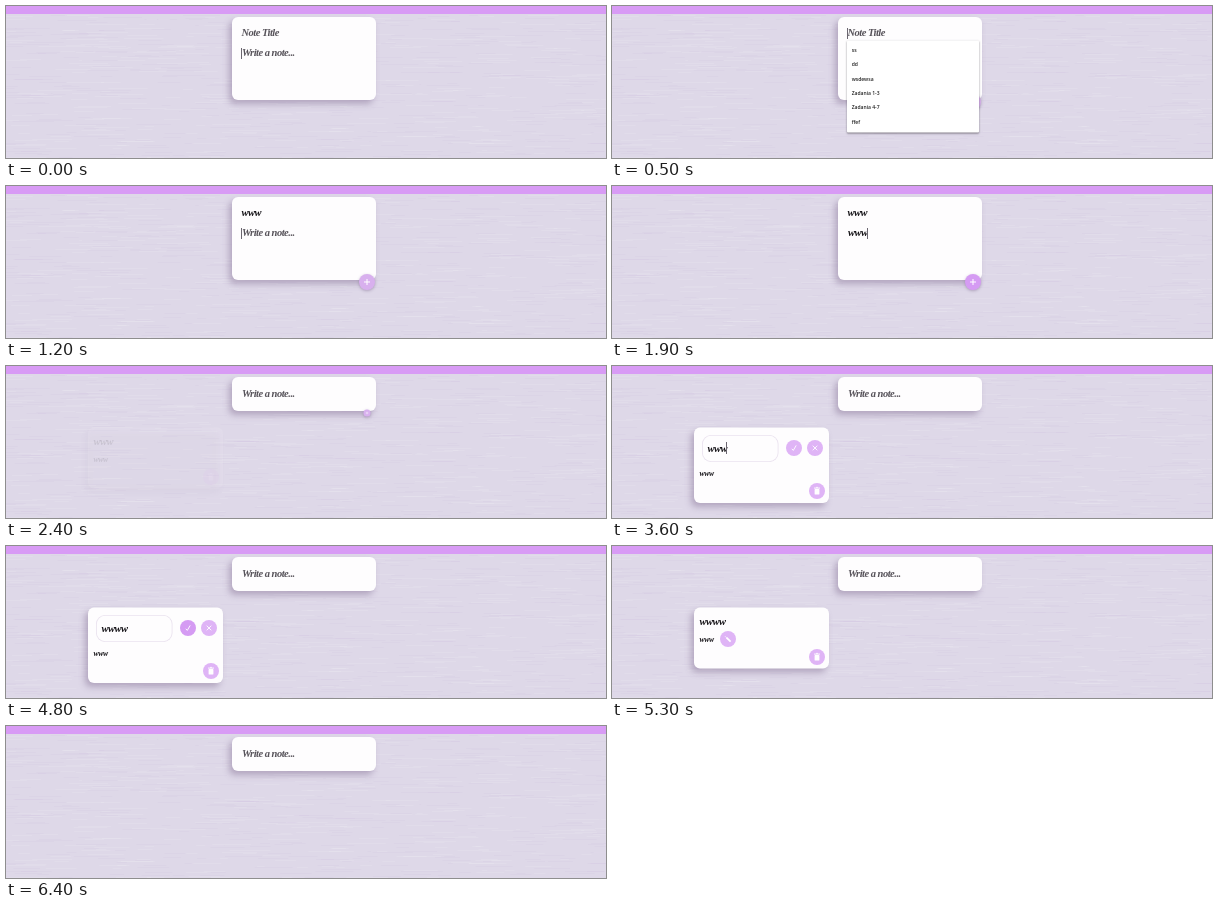
Animation of 600 by 152 pixels, one loop 7.6 s. Source, as an HTML page with a canvas:

```html
<!DOCTYPE html>
<html lang="en">
<head>
<meta charset="utf-8">
<title>Notes</title>
<style>
html, body { margin: 0; width: 100%; height: 100%; overflow: hidden; background: #ded8e8; }
canvas { display: block; }
</style>
</head>
<body>
<canvas id="stage" width="600" height="152"></canvas>
<script>
const LOOP = 7600, STEP = 100;
const SCRIPT = '"Liberation Serif", serif';
const HINT = '#57535a', INK = '#151317', LILAC = '#dfb4f6', LILAC_DARK = '#d59bf3';
const ctx = document.getElementById('stage').getContext('2d');
const paper = makePaper();

const clamp = v => Math.max(0, Math.min(1, v));
const ramp = (t, from, to) => clamp((t - from) / (to - from));
const between = (t, from, to) => t >= from && t < to;

// Lilac paper with a faint horizontal grain and the top bar.
function makePaper() {
  const sheet = document.createElement('canvas');
  sheet.width = 600;
  sheet.height = 152;
  const g = sheet.getContext('2d');
  let seed = 11;
  const rnd = () => (seed = (seed * 16807) % 2147483647) / 2147483647;
  g.fillStyle = '#ded8e8';
  g.fillRect(0, 0, 600, 152);
  for (let i = 0; i < 700; i++) {
    g.fillStyle = rnd() < 0.5 ? 'rgba(255,255,255,.1)' : 'rgba(196,180,212,.1)';
    g.fillRect(rnd() * 620 - 20, Math.floor(9 + rnd() * 143), 8 + rnd() * 34, 1);
  }
  g.fillStyle = '#d89bf5';
  g.fillRect(0, 0, 600, 8);
  return sheet;
}

function box(x, y, w, h, r, fill) {
  ctx.beginPath();
  ctx.roundRect(x, y, w, h, r);
  ctx.fillStyle = fill;
  ctx.fill();
}

function shaded(color, dx, dy, blur, draw) {
  ctx.save();
  ctx.shadowColor = color;
  ctx.shadowOffsetX = dx;
  ctx.shadowOffsetY = dy;
  ctx.shadowBlur = blur;
  draw();
  ctx.restore();
}

function card(x, y, w, h) {
  shaded('rgba(120,98,136,.42)', -3, 4, 6, () => box(x, y, w, h, 6, '#fefdfe'));
}

// Returns the x position just after the text.
function script(text, x, y, color = INK, size = 10.5) {
  ctx.font = `italic bold ${size}px ${SCRIPT}`;
  ctx.letterSpacing = `${-size * 0.048}px`;
  ctx.fillStyle = color;
  ctx.fillText(text, x, y);
  return x + ctx.measureText(text).width;
}

function caret(x, y, h = 11) {
  ctx.fillStyle = '#6b6670';
  ctx.fillRect(Math.round(x), y, 1, h);
}

function field(text, hint, x, y, focused) {
  const end = script(text || hint, x, y, text ? INK : HINT);
  if (focused) caret(text ? end : x - 1, y - 8);
}

function stroke(points, width = 1) {
  ctx.beginPath();
  points.forEach(([x, y], i) => i ? ctx.lineTo(x, y) : ctx.moveTo(x, y));
  ctx.strokeStyle = '#fff';
  ctx.lineWidth = width;
  ctx.stroke();
}

const icons = {
  plus() {
    stroke([[-3, 0], [3, 0]]);
    stroke([[0, -3], [0, 3]]);
  },
  check() { stroke([[-2.2, .8], [-.7, 2.4], [2.2, -2.6]], .9); },
  cross() {
    stroke([[-2.3, -2.3], [2.3, 2.3]], .9);
    stroke([[2.3, -2.3], [-2.3, 2.3]], .9);
  },
  pencil() {
    stroke([[-2.8, -2.6], [-1.6, -1.4]], 1);
    stroke([[-1.5, -1.3], [2.6, 2.6]], 1.8);
  },
  trash() {
    box(-2.4, -2, 4.8, 5.6, .7, '#fff');
    stroke([[-3, -2.9], [3, -2.9]], .9);
    stroke([[-1, -3.6], [1, -3.6]], .8);
  }
};

function button(icon, x, y, { hover = false, scale = 1, raised = false } = {}) {
  if (scale <= 0) return;
  ctx.save();
  ctx.translate(x, y);
  ctx.scale(scale, scale);
  const disc = () => {
    ctx.beginPath();
    ctx.arc(0, 0, 8, 0, Math.PI * 2);
    ctx.fillStyle = hover ? LILAC_DARK : raised ? '#d8b0ee' : LILAC;
    ctx.fill();
  };
  if (raised) shaded('rgba(90,60,110,.35)', 0, 1, 3, disc);
  else disc();
  icons[icon]();
  ctx.restore();
}

function suggestions(rows) {
  const h = rows.length > 1 ? 92 : 21;
  shaded('rgba(50,45,55,.6)', 0, 1, 2, () => box(235, 34.5, 132, h, 1, '#fff'));
  ctx.font = '600 5px "Open Sans", sans-serif';
  ctx.letterSpacing = '0px';
  ctx.fillStyle = '#222';
  rows.forEach((row, i) => ctx.fillText(row, 239.7, 46 + i * 14.3));
}

function typed(t, times) {
  return 'w'.repeat(times.filter(at => t >= at).length);
}

function composer(t) {
  const open = t < 2200;
  card(226, 11, 144, open ? 83 : 34);
  if (open) {
    field(typed(t, [700, 900, 1000]), 'Note Title', 235.5, 30, between(t, 500, 1200));
    field(typed(t, [1500, 1600, 1700]), 'Write a note...', 236, 50, t < 500 || t >= 1200);
  } else {
    script('Write a note...', 236, 30.5, HINT);
  }
  const scale = open ? ramp(t, 0, 300) : 1 - ramp(t, 2150, 2600);
  button('plus', 361, open ? 96 : 47, { scale, raised: true, hover: between(t, 1900, 2200) });
  if (between(t, 500, 700)) {
    suggestions(['ss', 'dd', 'wsdewsa', 'Zadania 1-3', 'Zadania 4-7', 'ffef']);
  } else if (between(t, 700, 900)) {
    suggestions(['wsdewsa']);
  }
}

function editor(t) {
  card(82, 61.5, 135, 75.5);
  box(90, 69, 76.5, 27, 9, '#e9e1ee');
  box(90.8, 69.8, 74.9, 25.4, 8.3, '#fefdfe');
  const end = script(typed(t, [0, 0, 0, 4200]), 95.5, 86);
  if (t < 4800) caret(end - .5, 76, 12);
  button('check', 182, 82, { hover: t >= 4500 });
  button('cross', 203, 82);
  script('www', 87.5, 109.5, INK, 7.7);
  button('trash', 205, 125);
}

function note(t) {
  card(82, 61.5, 135, 61);
  script(t < 5000 ? 'www' : 'wwww', 87.5, 78.5);
  script('www', 87.5, 95.5, INK, 7.7);
  if (between(t, 5300, 5800)) button('pencil', 116, 93);
  button('trash', 205, 111, { hover: t >= 6000 });
}

function savedNote(t) {
  if (!between(t, 2300, 6400)) return;
  if (between(t, 3600, 5000)) return editor(t);
  ctx.save();
  ctx.globalAlpha = ramp(t, 2300, 3300) * (t < 6300 ? 1 : .5);
  note(t);
  ctx.restore();
}

function frame(now) {
  const t = Math.floor((now % LOOP) / STEP) * STEP;
  ctx.drawImage(paper, 0, 0);
  composer(t);
  savedNote(t);
}

const start = performance.now();
function tick() {
  frame(performance.now() - start);
  requestAnimationFrame(tick);
}
tick();
</script>
</body>
</html>
```
